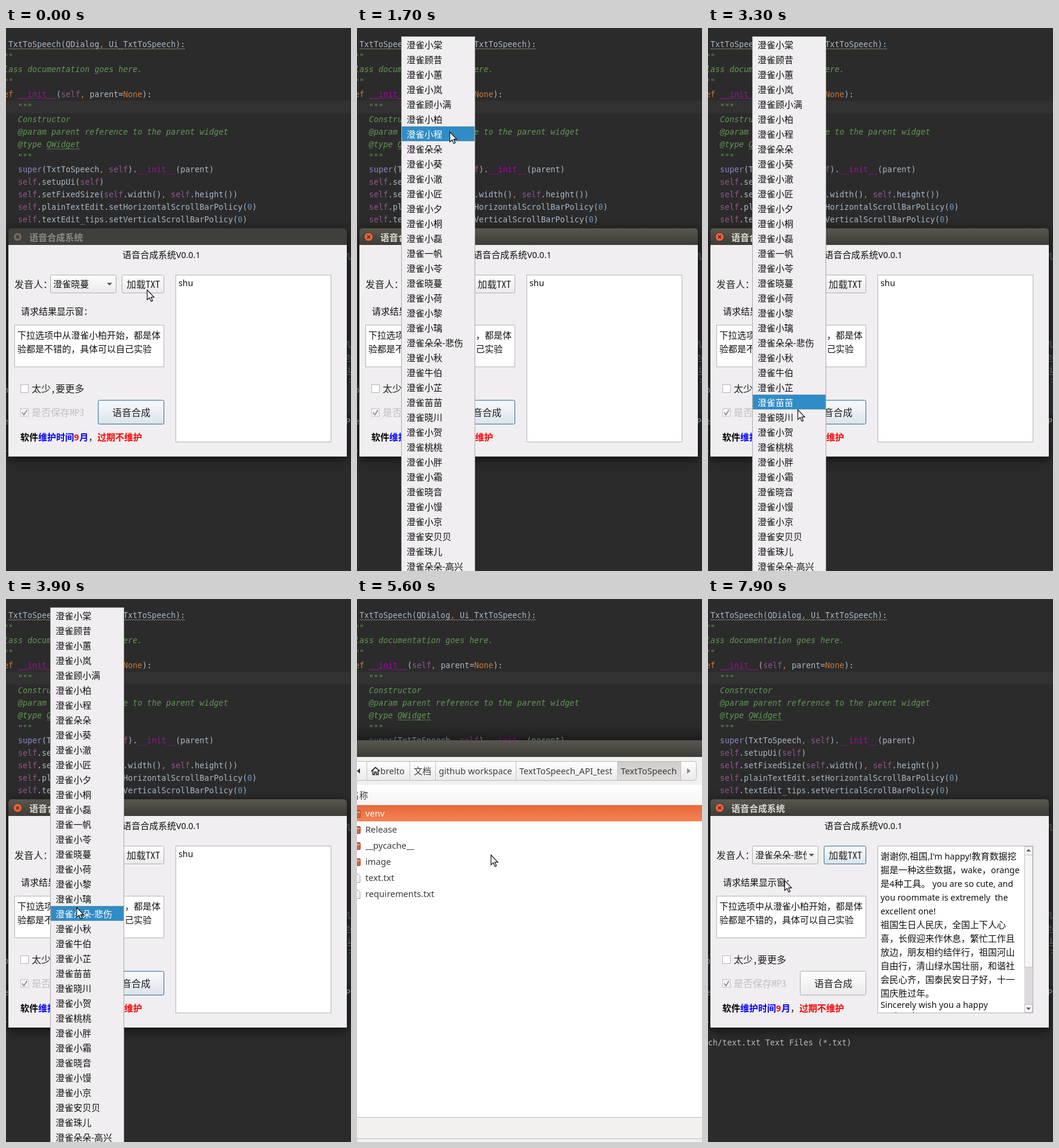
These frames come from a looping animation (578x911 px, 8 s). An HTML page:

```html
<!DOCTYPE html>
<html lang="zh-CN">
<head>
<meta charset="utf-8">
<title>语音合成系统</title>
<style>
html, body { margin: 0; width: 100%; height: 100%; overflow: hidden; background: #2b2b2b; }
#stage { display: block; width: 578px; height: 911px; }
text { white-space: pre; }
.code { font: 13.3px "DejaVu Sans Mono", monospace; fill: #a9b7c6; }
.doc { font-style: italic; fill: #629755; }
.magic { fill: #b200b2; } .self { fill: #94558d; } .key { fill: #cc7832; }
.num { fill: #6897bb; } .builtin { fill: #8888c6; }
.ui { font: 500 14.3px "Noto Sans", "Noto Sans CJK SC", sans-serif; fill: #111; }
.cjk { font: 15px "Noto Sans CJK SC", "Noto Sans CJK", sans-serif; }
.bold .cjk, .bold { font-weight: bold; }
.form { font: 16px "Noto Sans Mono CJK SC", "Noto Sans CJK SC", monospace; fill: #222; }
.files { font: 14.67px "Noto Sans", "Noto Sans CJK SC", sans-serif; fill: #3c3c3c; }
.title { fill: #dfdbd2; }
.dim .title { fill: #8c8982; }
.dim .bar { fill: #403f3b; }
.dim .close { fill: #6b6962; stroke: #33322e; }
#dialog { filter: drop-shadow(0 4px 9px rgba(0,0,0,.65)); }
#files { filter: drop-shadow(0 0 14px rgba(0,0,0,.75)); }
</style>
</head>
<body>
<svg id="stage" xmlns="http://www.w3.org/2000/svg" viewBox="0 0 578 911"></svg>
<script>
const LOOP = 8000, ROW = 25, FILE_ROW = 27, BRAND = '澄雀';
const voices = ('小棠 顾昔 小蕙 小岚 顾小满 小柏 小程 朵朵 小葵 小澈 小匠 小夕 小桐 小磊 一帆 小苓 晓蔓 小荷 ' +
  '小黎 小璃 朵朵-悲伤 小秋 牛伯 小芷 苗苗 晓川 小贺 桃桃 小胖 小霜 晓音 小馒 小京 安贝贝 珠儿 朵朵-高兴')
  .split(' ').map(name => BRAND + name);

const text = (cls, x, y, body, attrs = '') => `<text class="${cls}" x="${x}" y="${y}" ${attrs}>${body}</text>`;
// Chinese runs are set slightly larger than the Latin ones.
const ui = (x, y, str, attrs = '', cls = '') =>
  text('ui ' + cls, x, y, str.replace(/[\u2e80-\uffef]+/g, '<tspan class="cjk">$&</tspan>'), attrs);
const rect = (x, y, w, h, fill, attrs = '') =>
  `<rect x="${x}" y="${y}" width="${w}" height="${h}" fill="${fill}" ${attrs}/>`;
const box = (x, y, w, h, fill, stroke = '#b5b3b5', attrs = '') =>
  rect(x + .5, y + .5, w - 1, h - 1, fill, `stroke="${stroke}" ${attrs}`);
const path = (d, fill, attrs = '') => `<path d="${d}" fill="${fill}" ${attrs}/>`;
const group = (id, body) => `<g id="${id}">${body}</g>`;
const clip = (x, y, w, h, body) =>
  `<svg x="${x}" y="${y}" width="${w}" height="${h}" viewBox="${x} ${y} ${w} ${h}">${body}</svg>`;
const gradient = (id, top, bottom) => `<linearGradient id="${id}" x2="0" y2="1">
  <stop stop-color="${top}"/><stop offset="1" stop-color="${bottom}"/></linearGradient>`;
const wave = (x, y, width, color) =>
  path(`M${x} ${y}` + 'l2-2 2 2'.repeat(width / 4), 'none', `stroke="${color}" stroke-width=".8"`);

const tokens = [[/^__init__$/, 'magic'], [/^self$/, 'self'], [/^0$/, 'num'], [/^super$/, 'builtin'], [/./, 'key']];
const highlight = line => line.replace(/__init__|\bself\b|\bsuper\b|\bNone\b|\bdef\b|,|\b0\b(?=\)$)/g,
  word => `<tspan class="${tokens.find(([rule]) => rule.test(word))[1]}">${word}</tspan>`);

function editor() {
  const lines = [
    'class TxtToSpeech(QDialog, Ui_TxtToSpeech):',
    '    """', '    Class documentation goes here.', '    """',
    '    def __init__(self, parent=None):',
    '        """', '        Constructor', '        @param parent reference to the parent widget',
    '        @type QWidget', '        """',
    '        super(TxtToSpeech, self).__init__(parent)',
    '        self.setupUi(self)',
    '        self.setFixedSize(self.width(), self.height())',
    '        self.plainTextEdit.setHorizontalScrollBarPolicy(0)',
    '        self.textEdit_tips.setVerticalScrollBarPolicy(0)'];
  const isDoc = i => (i > 0 && i < 4) || (i > 4 && i < 10);
  const code = lines.map((line, i) => isDoc(i)
    ? text('code doc', -44, 32 + i * 21, line)
    : text('code', -44, 32 + i * 21, highlight(line))).join('');
  return rect(0, 0, 578, 911, '#2b2b2b') + rect(0, 122, 578, 21, '#323232') + code +
    wave(4, 36, 296, '#9a9a80') + wave(68, 204, 56, '#629755') + wave(20, 119, 64, '#7a2a7a') +
    rect(0, 596, 578, 52, '#313335') +
    [[564, 388, '机'], [564, 536, '机'], [568, 556, 'ea'], [571, 578, 'i'], [572, 595, ':']]
      .map(([x, y, s]) => text('code', x, y, s, 'opacity=".6"')).join('') +
    path('M570 559.5h8M570 581.5h8', 'none', 'stroke="#777"') +
    text('code', -4, 612, 'o') + text('code', -4, 665, 'e') + text('code', 569, 665, 'PI') + text('code', -4, 711, '.') +
    group('log', text('code', 0, 749, 'ch/text.txt Text Files (*.txt)', 'style="fill:#bbb"'));
}

function loadedText() {
  const lines = ["谢谢你,祖国,I'm happy!教育数据挖", '掘是一种这些数据，wake，orange', '是4种工具。 you are so cute, and',
    'you roommate is extremely  the', 'excellent one!', '祖国生日人民庆，全国上下人心', '喜，长假迎来作休息，繁忙工作且',
    '放边，朋友相约结伴行，祖国河山', '自由行，清山绿水国壮丽，和谐社', '会民心齐，国泰民安日子好，十一', '国庆胜过年。',
    'Sincerely wish you a happy', 'National Day.'];
  return clip(285, 415, 245, 279, lines.map((line, i) =>
      ui(289, i < 11 ? 437 + i * 23 : 686 + (i - 11) * 18, line)).join('')) +
    rect(530, 415, 14, 279, '#dcdadc') + box(530, 415, 14, 15, '#f7f6f7', '#c4c2c4') +
    box(530, 429, 14, 189, '#f7f6f7', '#c4c2c4') + box(530, 680, 14, 14, '#f7f6f7', '#c4c2c4') +
    path('M533 423.500h8l-4-4zM533 685.500h8l-4 4z', '#555');
}

function dialog() {
  const bottom = [[24, '软件', '#000'], [54, '维护时间', '#00f'], [114, '9', '#f00'], [123, '月', '#00f'], [153, '过期不维护', '#f00']];
  return rect(4, 350, 567, 369, '#f0eef0') +
    path('M4 364v-22q0-6 6-6h555q6 0 6 6v22z', 'url(#titleBar)', 'class="bar"') +
    '<circle class="close" cx="19.5" cy="350.5" r="7.300" fill="#ee6238" stroke="#35332e"/>' +
    path('M17 348l5 5m0-5l-5 5', 'none', 'stroke="#45291f" stroke-width="1.500"') +
    ui(39, 357, '语音合成系统', '', 'bold title') +
    ui(195, 386, '语音合成系统V0.0.1') +
    text('form', 14, 436, '发音人：') +
    box(74, 414, 111, 31, 'url(#button)', '#b0aeb0', 'rx="2"') +
    clip(79, 416, 86, 27, group('voiceBefore', ui(79, 435, voices[16])) + group('voiceAfter', ui(79, 435, voices[20]))) +
    path('M169 427.500h9l-4.500 4.500z', '#555') +
    box(194, 414, 71, 31, 'url(#button)', '#b0aeb0', 'rx="2" id="load"') +
    text('form', 202, 436, '加载TXT') +
    ui(25, 481, '请求结果显示窗：') +
    box(14, 498, 251, 71, '#fff') +
    ui(19, 521, `下拉选项中从${voices[5]}开始，都是体`) + ui(19, 544, '验都是不错的，具体可以自己实验') +
    box(24, 598, 14, 14, '#fff') + text('form', 43, 611, '太少,要更多') +
    box(24, 638, 14, 14, '#f4f2f4', '#c4c2c4') + path('M27 645l3 4 5-8', 'none', 'stroke="#8c8c8c" stroke-width="1.800"') +
    text('form', 43, 651, '是否保存MP3', 'style="fill:#c0bec0"') +
    box(154, 624, 111, 41, 'url(#primary)', '#2f6b99', 'rx="2" id="speak"') +
    text('form', 178, 651, '语音合成') +
    bottom.map(([x, s, color]) => ui(x, 691.5, s, `style="fill:${color}"`, 'bold')).join('') + ui(138, 691.5, '，') +
    box(284, 414, 261, 281, '#fff') +
    group('textBefore', ui(289, 433, 'shu')) + group('textAfter', loadedText());
}

function popup() {
  return box(74, 14, 124, 900, '#f0eef0', '#a9a7a9') +
    box(75, 0, 122, ROW, '#308cc6', '#22648e', 'id="hover" stroke-dasharray="1 1"') +
    voices.map((name, i) => ui(83, 34 + i * ROW, name, '', 'voice')).join('');
}

function fileChooser() {
  const edges = [16, 88, 131, 266, 436, 542];
  const crumbs = [[39, 'brelto'], [95, '文档'], [137, 'github workspace'], [272, 'TextToSpeech_API_test'], [442, 'TextToSpeech']];
  const names = ['venv', 'Release', '__pycache__', 'image', 'text.txt', 'requirements.txt'];
  const icon = i => i < 4
    ? box(-9, 354 + i * FILE_ROW, 15, 13, '#d9603a', '#a8452a', 'rx="1"') + rect(-8, 357 + i * FILE_ROW, 13, 2, '#f0a385')
    : path(`M-6 ${353.5 + i * FILE_ROW}h8l3 3v11h-11z`, '#f4f4f4', 'stroke="#999"');
  return rect(-20, 237, 618, 700, '#f2f1f0') + rect(-20, 237, 618, 28, 'url(#titleBar)') +
    box(-10, 272, 579, 33, 'url(#button)', '#bdbab7', 'rx="4"') + rect(436, 273, 106, 31, 'url(#crumb)') +
    edges.map(x => rect(x, 273, 1, 31, '#c4c1be')).join('') +
    path('M5 284v9l-5-4.500z', '#333') + path('M553 284v9l6-4.500z', '#888') +
    path('M24 289l7-6.500 7 6.500M26.500 288v6.500h3v-4h3v4h3V288', 'none', 'stroke="#333" stroke-width="1.800"') +
    crumbs.map(([x, s]) => text('files', x, 294, s)).join('') +
    rect(0, 312, 578, 34, 'url(#header)') + rect(0, 345, 578, 1, '#d3d0cd') + text('files', -11, 335, '名称') +
    rect(0, 346, 578, 523, '#fff') + rect(0, 0, 578, FILE_ROW, 'url(#selected)', 'id="selection"') +
    names.map((name, i) => icon(i) + text('files file', 14, 365 + i * FILE_ROW, name)).join('') +
    rect(0, 869, 578, 1, '#bdbab7') + rect(0, 905, 578, 1, '#bdbab7');
}

const stage = document.getElementById('stage');
stage.innerHTML = '<defs>' + [
  ['titleBar', '#59574f', '#3c3b37'], ['button', '#fefefe', '#ebe9eb'], ['pressed', '#d2d0d2', '#dedcde'],
  ['primary', '#fafbfc', '#dbe3ea'], ['crumb', '#cfcdcc', '#dedcda'], ['header', '#fff', '#f5f4f3'],
  ['selected', '#e8673a', '#f58155']].map(stops => gradient(...stops)).join('') + '</defs>' +
  editor() + group('dialog', dialog()) + group('popup', popup()) + group('files', fileChooser()) +
  group('cursor', path('M.5.500v16.500l3.900-3.500 2.700 6.200 2.500-1.100-2.600-6h5z', '#fff', 'stroke="#111" stroke-width="1.200"'));

const byId = id => document.getElementById(id);
const show = (id, on) => byId(id).style.display = on ? '' : 'none';
const voiceLabels = [...document.querySelectorAll('.voice')];
const fileLabels = [...document.querySelectorAll('.file')];

// Pointer path: time, x, y
const pointer = [[0, 236, 439], [200, 236, 439], [800, 150, 432], [1200, 150, 432], [1700, 155, 174], [2200, 100, 28],
  [2300, 100, 28], [2700, 75, 598], [3300, 150, 640], [3400, 150, 640], [3900, 118, 517], [4200, 118, 517],
  [4600, 60, 470], [5000, 224, 429], [5800, 224, 429], [6200, 150, 486], [6600, 51, 465], [6800, 51, 465],
  [7200, 79, 464], [7600, 79, 464], [7900, 128, 472], [LOOP, 128, 472]];

function pointerAt(t) {
  const next = pointer.findIndex(([time]) => time > t);
  const [t0, x0, y0] = pointer[next - 1], [t1, x1, y1] = pointer[next];
  const k = (t - t0) / (t1 - t0);
  return [Math.round(x0 + (x1 - x0) * k), Math.round(y0 + (y1 - y0) * k)];
}

function render(now) {
  const t = Math.floor(now % LOOP / 100) * 100;
  const [x, y] = pointerAt(t);
  const chosen = t >= 4300, clicked = t >= 5100, loaded = t >= 7700;
  byId('cursor').setAttribute('transform', `translate(${x} ${y})`);

  byId('dialog').classList.toggle('dim', t < 1000);
  show('popup', t >= 1000 && !chosen);
  const hovered = Math.floor((y - 16) / ROW);
  byId('hover').setAttribute('y', 16.5 + hovered * ROW - 1);
  voiceLabels.forEach((label, i) => label.style.fill = i === hovered ? '#fff' : '');

  show('voiceBefore', !chosen);
  show('voiceAfter', chosen);
  byId('load').setAttribute('stroke', clicked ? '#2f6b99' : '#b0aeb0');
  byId('load').setAttribute('fill', t === 5100 ? 'url(#pressed)' : clicked ? 'url(#primary)' : 'url(#button)');
  byId('speak').setAttribute('stroke', clicked ? '#b0aeb0' : '#2f6b99');
  byId('speak').setAttribute('fill', clicked ? 'url(#button)' : 'url(#primary)');

  show('files', t >= 5600 && !loaded);
  const selected = t < 6900 ? 0 : 4;
  byId('selection').setAttribute('y', 346 + selected * FILE_ROW);
  fileLabels.forEach((label, i) => label.style.fill = i === selected ? '#fff' : '');

  show('textBefore', !loaded);
  show('textAfter', loaded);
  show('log', loaded);
}

const start = performance.now();
function tick() {
  render(performance.now() - start);
  requestAnimationFrame(tick);
}
tick();
</script>
</body>
</html>
```
